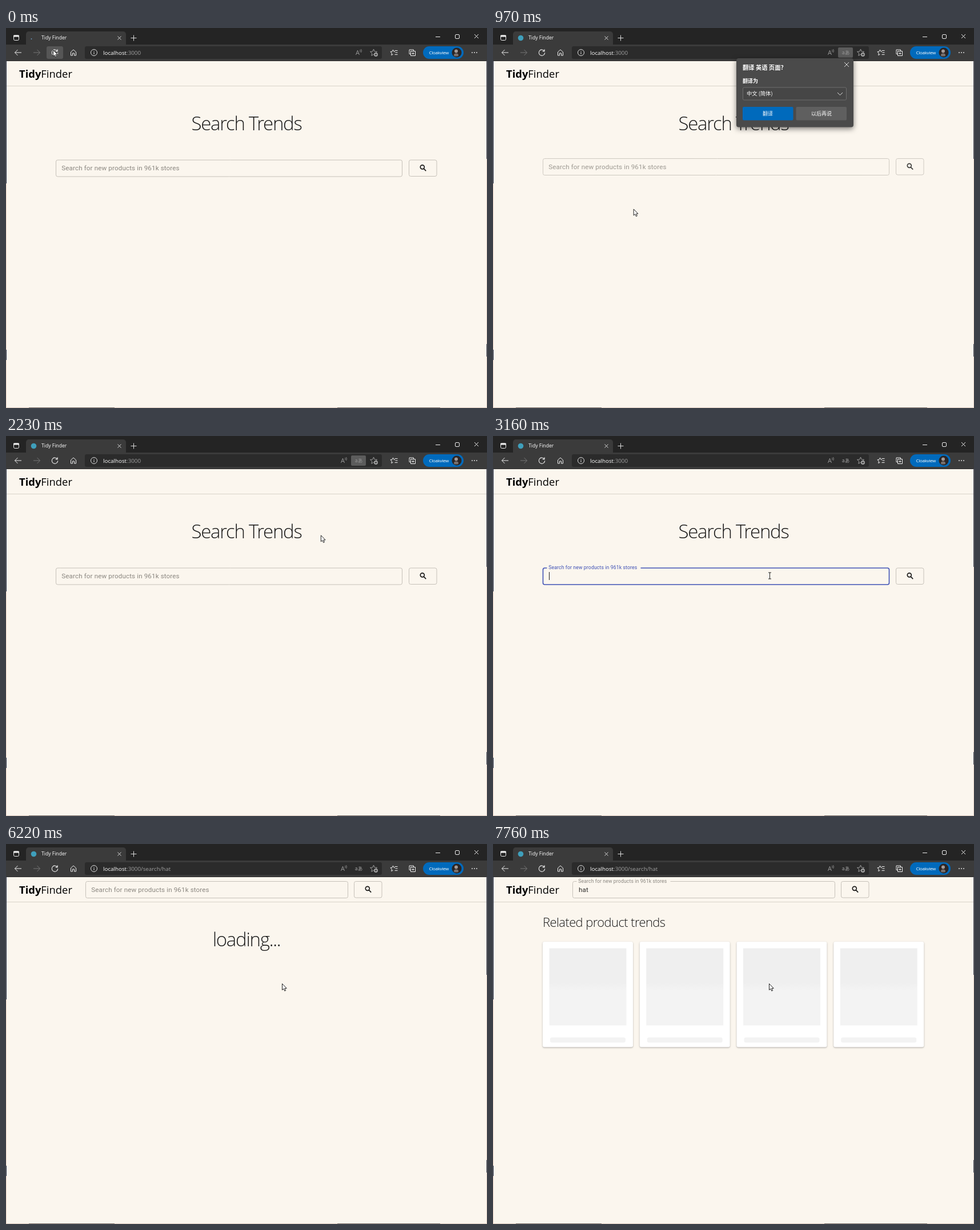
Write an HTML page with a canvas that moves like this. It is 842 by 665 pixels and loops after 8 s.

```html
<!DOCTYPE html>
<html lang="en">
<head>
<meta charset="utf-8">
<title>Tidy Finder</title>
<style>
  html, body { margin: 0; width: 100%; height: 100%; overflow: hidden; background: #faf5ec; }
  canvas { display: block; }
</style>
</head>
<body>
<canvas id="stage" width="842" height="665"></canvas>
<script>
const LOOP = 8000;
const ctx = document.getElementById('stage').getContext('2d');
const UI = '"Open Sans", "Noto Sans", sans-serif';
const FORM = 'Roboto, sans-serif';
const HAN = '"Noto Sans CJK SC", "Noto Sans CJK", sans-serif';
const PAGE = '#fbf6ee', INK = '#1b1b1b', BLUE = '#3f51b5';
const HINT = 'Search for new products in 961k stores';

const clamp = x => Math.max(0, Math.min(1, x));
const easeOut = x => 1 - (1 - clamp(x)) ** 3;
const mix = (a, b, k) => a + (b - a) * k;

function rect(x, y, w, h, fill, r = 0) {
  ctx.fillStyle = fill;
  ctx.beginPath();
  ctx.roundRect(x, y, w, h, r);
  ctx.fill();
}

function frame(x, y, w, h, color, r = 0, width = 1) {
  ctx.strokeStyle = color;
  ctx.lineWidth = width;
  ctx.beginPath();
  ctx.roundRect(x, y, w, h, r);
  ctx.stroke();
}

function path(d, color, x = 0, y = 0, width = 1, fill) {
  ctx.save();
  ctx.translate(x, y);
  const shape = new Path2D(d);
  if (fill) { ctx.fillStyle = fill; ctx.fill(shape); }
  ctx.strokeStyle = color;
  ctx.lineWidth = width;
  ctx.stroke(shape);
  ctx.restore();
}

function disc(x, y, r, fill) {
  ctx.fillStyle = fill;
  ctx.beginPath();
  ctx.arc(x, y, r, 0, 7);
  ctx.fill();
}

// Draws text centred vertically on y and returns its right edge.
function text(str, x, y, size, color, { family = UI, weight = 400, spacing = 0, align = 'left' } = {}) {
  ctx.font = `${weight} ${size}px ${family}`;
  ctx.letterSpacing = spacing + 'px';
  ctx.textAlign = align;
  ctx.fillStyle = color;
  ctx.fillText(str, x, y + size * 0.36);
  const end = x + ctx.measureText(str).width;
  ctx.letterSpacing = '0px';
  return end;
}

function tabStrip(t) {
  rect(0, 0, 842, 58, '#242424');
  rect(0, 29, 842, 28.5, '#3b3b3b');
  rect(35, 6, 175, 24, '#3b3b3b', [5, 5, 0, 0]);
  frame(13.5, 13, 9, 8.5, '#eee', 2);
  rect(13, 12.5, 10, 3, '#eee', 1);
  if (t < 430) {
    const a = t / 160;
    disc(48 - 3.5 * Math.cos(a), 17.5 + 3 * Math.cos(a + 1), 0.9, '#72a9d8');
  } else {
    disc(48.5, 17.5, 4.8, '#3f9fbb');
  }
  text('Tidy Finder', 62, 17, 8.6, '#fff');
  path('M-3-3L3 3M3-3L-3 3', '#ddd', 198.5, 17.5);
  path('M-5 0H5M0-5V5', '#ddd', 223.5, 17.5);
  path('M0 0H8', '#eee', 752, 15.5);
  frame(786.5, 11.5, 7, 7, '#eee', 1.5);
  path('M-3.5-3.5L3.5 3.5M3.5-3.5L-3.5 3.5', '#eee', 823.5, 14.5);
}

function toolbar(t) {
  path('M11.5 0H0M5-5L0 0L5 5', '#eee', 15.5, 43);
  path('M0 0H11.5M6.5-5L11.5 0L6.5 5', '#777', 48, 43);
  if (t < 310) rect(71, 32, 29, 22, '#565656', 3);
  path('M4.3-3A5.2 5.2 0 1 0 5.2 0M4.6-6V-2.6H1.2', '#eee', 85.5, 43.2, 1.1);
  path('M-4.5-1L0-5L4.5-1V5H1.5V1H-1.5V5H-4.5Z', '#eee', 118, 43);

  rect(138, 32, 520, 22, '#2b2b2b', 3);
  path('M5.5 0A5.5 5.5 0 1 1-5.5 0A5.5 5.5 0 1 1 5.5 0M0-.8V3M0-3V-1.8', '#ddd', 154, 43);
  const hostEnd = text('localhost', 170, 43, 9.8, '#fff');
  text(t < 5980 ? ':3000' : ':3000/search/hat', hostEnd, 43, 9.8, '#a0a0a0');

  const translatable = t >= 550;
  const reader = translatable ? 586 : 612;
  text('A', reader, 43.5, 11, '#999');
  path('M0-3Q1.5-1 0 1M2-4Q4-1 2 2', '#999', reader + 7.5, 41, 0.8);
  if (translatable) {
    const lit = t < 2350;
    if (lit) rect(604, 34, 26, 18, '#5c5c5c', 2);
    text('aあ', 617.5, 43, 8.5, lit ? '#999' : '#aaa', { family: HAN, align: 'center' });
  }
  const star = 'M0-6L1.7-2L6-1.6L2.8 1.2L3.7 5.3L0 3.2L-3.7 5.3L-2.8 1.2L-6-1.6L-1.7-2Z';
  path(star, '#aaa', 643.5, 43, 0.9);
  disc(647.5, 46.5, 3.4, '#aaa');
  path('M-2 0H2M0-2V2', '#2b2b2b', 647.5, 46.5);
  path('M1.5-1.5L-.5-1.8L-2-5L-3.5-1.8L-6.5-1.4L-4.2 1L-4.8 4.5L-2 3M1-3.5H6M2 0H6M1 3.5H6', '#eee', 679.5, 43);
  path('M-5-5H2.5V-3M-5-5V2.5H-3M-2.5-2.5H5.5V5.5H-2.5ZM1.5-.5V3.5M-.5 1.5H3.5', '#eee', 711, 43);
  rect(730, 32, 71, 22, '#006abc', 11);
  text('Cloakview', 740.5, 43, 8, '#fff', { spacing: -0.3 });
  disc(789, 43, 8.5, '#2c2524');
  disc(788, 40.5, 3, '#a19a98');
  rect(784, 44.5, 8, 5, '#77706e', [4, 4, 2, 2]);
  for (const x of [816, 820, 824]) disc(x, 43, 0.9, '#eee');
}

function windowEdge() {
  rect(0, 57, 1, 215, '#293044');
  rect(0, 272, 1, 393, '#e9d2c5');
  rect(0, 563, 1, 18, '#293044');
  rect(841, 57, 1, 608, '#e3d2c6');
  rect(841, 57, 1, 172, '#434350');
  rect(841, 553, 1, 22, '#434350');
  rect(0, 664, 842, 1, '#d9c6ba');
  rect(40, 664, 150, 1, '#74655f');
  rect(580, 664, 180, 1, '#74655f');
}

// Outlined input whose label slides into a notch as `shrink` goes from 0 to 1.
function field(x, y, w, { shrink = 0, border = '#c6c1b9', width = 1, labelColor = '#8b8780', value = '' }) {
  const h = 29, r = 3, left = x + 7, right = left + 164 * shrink;
  path(`M${left} ${y}H${x + r}Q${x} ${y} ${x} ${y + r}V${y + h - r}Q${x} ${y + h} ${x + r} ${y + h}` +
    `H${x + w - r}Q${x + w} ${y + h} ${x + w} ${y + h - r}V${y + r}Q${x + w} ${y} ${x + w - r} ${y}H${right}`,
    border, 0, 0, width);
  const size = 11.67 * mix(1, 0.75, shrink);
  text(HINT, x + 9.7, y + mix(13.8, -1, shrink), size, labelColor, { family: FORM, spacing: size * 0.0094 });
  return text(value, x + 10.5, y + 14.3, 11.67, '#2c2b29', { family: FORM, spacing: 0.11 });
}

function searchButton(x, y) {
  frame(x, y, 48.5, 28.5, '#c6c1b9', 3);
  path('M3.3-2A3.5 3.5 0 1 1-3.7-2A3.5 3.5 0 1 1 3.3-2M2.3 .8L6.2 4.8', '#1c1b1a', x + 23.5, y + 14.3, 1.7);
}

function heading(str) {
  text(str, 421, 167, 33, INK, { weight: 300, spacing: -1.3, align: 'center' });
}

function homePage(t) {
  heading('Search Trends');
  // The form leaves on reload, then drops back in.
  const shown = t < 140 ? 1 : clamp((t - 520) / 540);
  ctx.save();
  ctx.globalAlpha = shown;
  ctx.translate(0, -15 * (1 - shown));
  const focused = t >= 2890;
  const value = 'hat'.slice(0, (t >= 4320) + (t >= 4590) + (t >= 5300));
  const style = focused ? { border: BLUE, width: 1.6, labelColor: BLUE } : t >= 2500 ? { border: '#34322f' } : {};
  const end = field(87.5, 231, 606, { ...style, value, shrink: easeOut((t - 2870) / 270) });
  const lastKey = [5300, 4590, 4320, 2890].find(k => t >= k);
  const blinkOn = Math.floor((t - lastKey) / 535) % 2 === 0;
  if (focused && blinkOn) rect(Math.round(end), 238, 1, 14, '#222');
  if (value) path('M-3-3L3 3M3-3L-3 3', '#3a5bb0', 678.5, 245.3, 1.9);
  searchButton(705.5, 231);
  ctx.restore();
}

function card(x, t) {
  ctx.save();
  ctx.shadowColor = 'rgba(0,0,0,.32)';
  ctx.shadowBlur = 2.5;
  ctx.shadowOffsetY = 1;
  rect(x, 171, 158, 184.5, '#fff', 3);
  ctx.restore();
  const grey = v => `rgb(${v},${v},${v})`;
  const top = mix(226, 239, clamp((t - 6640) / 240));
  const low = t < 7760 ? top : 243;
  const shade = ctx.createLinearGradient(0, 243, 0, 255);
  shade.addColorStop(0, grey(top));
  shade.addColorStop(1, grey(low));
  rect(x + 11.5, 182.5, 135, 135, shade);
  rect(x + 13, 338.5, 132, 9, grey(low), 3);
}

function resultsPage(t) {
  const ready = t >= 6640;
  field(139.5, 65.5, 459, { shrink: ready ? easeOut((t - 6594) / 200) : 0, value: ready ? 'hat' : '' });
  searchButton(609.5, 65.5);
  if (!ready) return heading('loading...');
  text('Related product trends', 87, 137, 22, INK, { weight: 300, spacing: -0.6 });
  for (let i = 0; i < 4; i++) card(87 + i * 169.75, t);
}

function translatePopup(t) {
  if (t < 550 || t >= 2230) return;
  const white = { family: HAN };
  ctx.save();
  ctx.globalAlpha = clamp((2230 - t) / 200);
  ctx.save();
  ctx.shadowColor = 'rgba(0,0,0,.5)';
  ctx.shadowBlur = 10;
  ctx.shadowOffsetY = 3;
  rect(426, 53, 205, 120.5, '#4a4a4a', 4);
  ctx.restore();
  text('翻译 英语 页面?', 437, 69, 10.3, '#fff', { ...white, weight: 700 });
  path('M-4-4L4 4M4-4L-4 4', '#ddd', 619, 64);
  text('翻译为', 437, 92.5, 9, '#fff', { ...white, weight: 700 });
  rect(437, 103.5, 182, 23, '#464646', 2);
  frame(437.5, 104, 181, 22, '#6e6e6e', 2);
  text('中文 (简体)', 444, 114.7, 9.3, '#fff', white);
  path('M-4.5-2L0 2.5L4.5-2', '#ddd', 607.5, 115);
  rect(437, 138, 88.5, 23.5, '#006abc', 2);
  rect(530.5, 138, 88.5, 23.5, '#5f5f5f', 2);
  text('翻译', 481, 149.7, 9, '#fff', { ...white, align: 'center' });
  text('以后再说', 575, 149.7, 9, '#fff', { ...white, align: 'center' });
  ctx.restore();
}

// time, x, y of the pointer tip
const ROUTE = [
  [0, 82, 38], [200, 82, 38], [430, 74, 300], [550, 68, 420], [700, 68, 423], [820, 150, 398],
  [970, 245, 317], [1220, 420, 180], [1460, 545, 100], [1720, 614, 60], [1960, 614, 60],
  [2080, 590, 145], [2230, 551, 173], [2350, 535, 212], [2500, 500, 236], [2750, 483, 244], [LOOP, 483, 244]
];

function pointer(t) {
  const i = ROUTE.findIndex(p => p[0] > t);
  const [t0, x0, y0] = ROUTE[i - 1], [t1, x1, y1] = ROUTE[i];
  const k = (t - t0) / (t1 - t0), x = mix(x0, x1, k), y = mix(y0, y1, k);
  if (t >= 2500 && t < 5840) {
    path('M-2.5-5.5H2.5M-2.5 5.5H2.5M0-5.5V5.5', '#222', x + 1.5, y + 0.5);
  } else {
    path('M.5 .5V11.5L3 9.3L4.8 13.2L6.6 12.4L4.9 8.6H8.3Z', '#222', x, y, 1, '#fff');
  }
}

function draw(now) {
  const t = now % LOOP;
  rect(0, 0, 842, 665, PAGE);
  tabStrip(t);
  toolbar(t);
  const brandEnd = text('Tidy', 23, 80, 18.4, '#000', { weight: 700 });
  text('Finder', brandEnd, 80, 18.4, '#000');
  rect(0, 101, 842, 1, '#d8d3ca');
  if (t < 5980) homePage(t); else resultsPage(t);
  windowEdge();
  translatePopup(t);
  pointer(t);
  requestAnimationFrame(draw);
}
requestAnimationFrame(draw);
</script>
</body>
</html>
```
